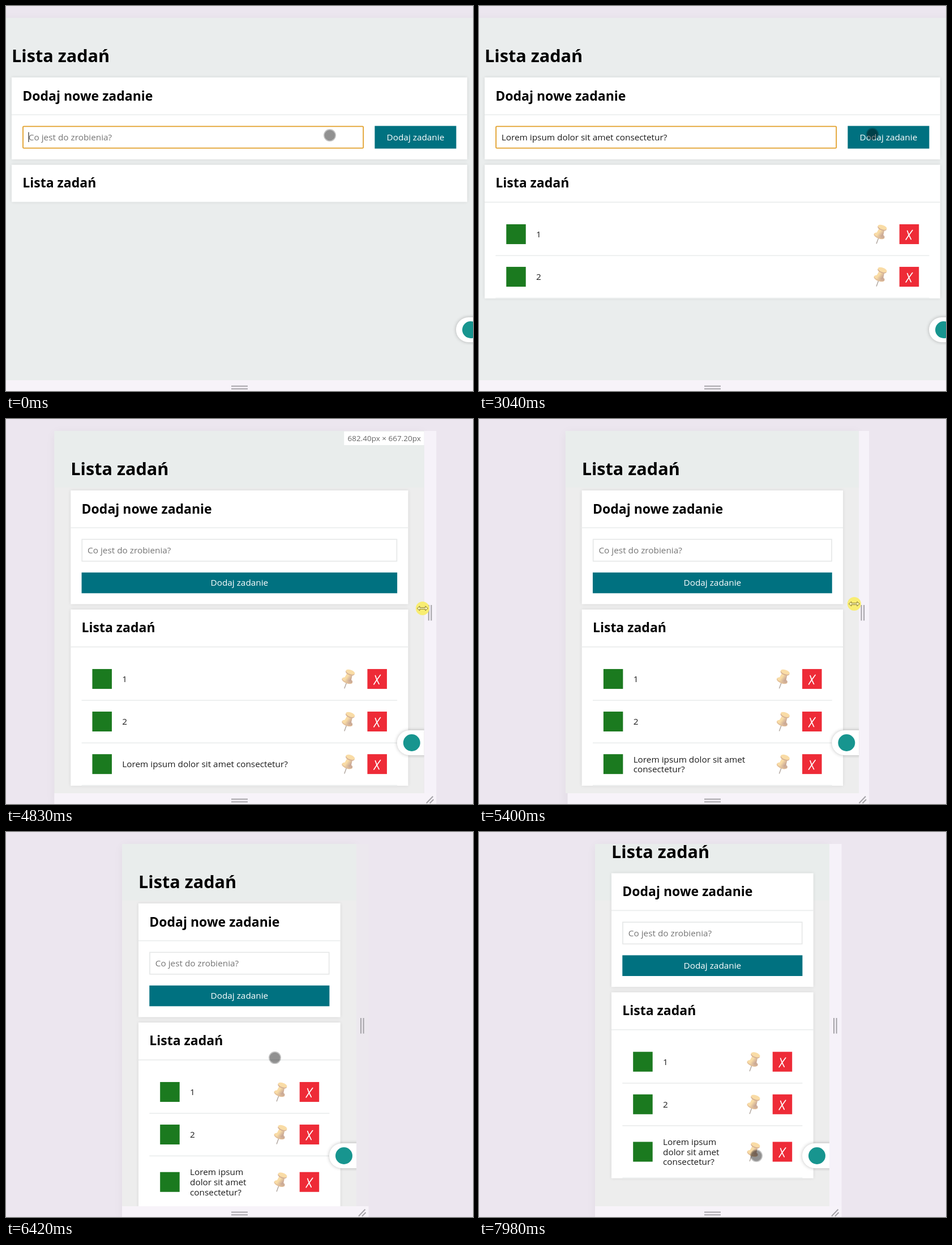
An HTML page for the animation above (8 s loop, 825 px wide and 679 px high).

```html
<!DOCTYPE html>
<html lang="pl">
<head>
<meta charset="utf-8">
<title>Lista zadań</title>
<style>
html, body { margin: 0; width: 100%; height: 100%; overflow: hidden; background: #ece6ef; }
svg { display: block; width: 825px; height: 679px; font-family: "Open Sans", sans-serif; font-size: 15.33px; fill: #1c1c1c; white-space: pre; }
.h1 { font-size: 30.66px; font-weight: 700; fill: #000; }
.h2 { font-size: 23px; font-weight: 700; fill: #000; }
.hint { fill: #757575; }
.btn { fill: #fff; text-anchor: middle; }
.tag { font-size: 13.5px; fill: #666; text-anchor: end; }
</style>
</head>
<body>
<svg viewBox="0 0 825 679" xmlns="http://www.w3.org/2000/svg">
  <defs>
    <filter id="soft" x="-10%" y="-10%" width="120%" height="120%"><feGaussianBlur stdDeviation="3"/></filter>
    <filter id="wide" x="-10%" y="-10%" width="120%" height="120%"><feGaussianBlur stdDeviation="9"/></filter>
    <linearGradient id="shade" x1="0" x2="1" y1="0" y2=".4">
      <stop offset=".45" stop-color="#f9dca6"/><stop offset="1" stop-color="#c9a896"/>
    </linearGradient>
    <clipPath id="view"><rect id="hole" y="21" height="639"/></clipPath>
    <g id="pin" transform="rotate(20)">
      <path d="M0 5V18" stroke="#b3a9a2" stroke-width="1.5"/>
      <ellipse cy="3.5" rx="10" ry="4.5" fill="#e3bf98"/>
      <ellipse cy="2.2" rx="9.6" ry="4" fill="url(#shade)"/>
      <path d="M-4.5 -11H5L6.5 2Q0 6 -6.5 2Z" fill="url(#shade)"/>
      <ellipse cy="-11.5" rx="8.3" ry="4.2" fill="#d5b195"/>
      <ellipse cy="-13" rx="8.3" ry="3.8" fill="#f9dca6"/>
    </g>
    <g id="del">
      <rect width="34.5" height="35" fill="#ee2b37"/>
      <path d="M14 11.5C15 15 18 22 20.5 26.5M23 10.5C19 16 15 21 11.5 27" fill="none" stroke="#fff" stroke-width="1.7" stroke-linecap="round"/>
    </g>
    <g id="resize">
      <circle r="12" fill="#f8ed72"/>
      <path d="M-9.5 0L-5 -4V-1.3H5V-4L9.5 0L5 4V1.3H-5V4Z" fill="#fbf6b8" stroke="#84762c" stroke-width="1"/>
    </g>
    <g id="dot">
      <circle r="11" fill="#000" fill-opacity=".24"/>
      <circle r="9.3" fill="#000" fill-opacity=".25"/>
    </g>
  </defs>
  <g id="scene"></g>
</svg>
<script>
const LOOP = 8000, SCALE = 0.9579, MID = 412, LINE = 17.6;
const LOREM = "Lorem ipsum dolor sit amet consectetur?";
const scene = document.getElementById("scene");
const hole = document.getElementById("hole");
const pen = document.createElement("canvas").getContext("2d");
pen.font = '15.33px "Open Sans", sans-serif';

// keys: [time, value, value...] joined by straight lines
function track(keys, t) {
  if (t <= keys[0][0]) return keys[0].slice(1);
  for (let i = 1; i < keys.length; i++) {
    const a = keys[i - 1], b = keys[i];
    if (t < b[0]) {
      const k = (t - a[0]) / (b[0] - a[0]);
      return a.slice(1).map((v, j) => v + (b[j + 1] - v) * k);
    }
  }
  return keys[keys.length - 1].slice(1);
}

const WIDTH = [[4080, 862], [4320, 823], [4830, 653.7], [5400, 519], [5730, 418], [5800, 418], [5900, 414]];
const SCROLL = [[6450, 0], [6810, 53.3]];
const POINTER = [
  [0, 572, 228], [40, 572, 228], [100, 629, 229], [700, 629, 229], [1000, 695, 226],
  [3400, 695, 226], [3660, 840, 320], [4080, 828, 339], [4320, 814, 337], [4830, 736, 334],
  [5400, 663, 326], [5730, 626, 330], [6250, 626, 332], [6420, 475, 398], [6600, 473, 418],
  [6970, 473, 419], [7250, 551, 545], [7430, 535, 567], [7800, 535, 572], [7980, 490, 571]
];
// caret visible from..to
const CARET = [[0, 430], [600, 1490], [1490, 2430], [2550, 3040], [3370, 3870]];

const within = (t, a, b) => t >= a && t < b;
const rect = (x, y, w, h, fill, more = "") =>
  `<rect x="${x}" y="${y}" width="${Math.max(0, w)}" height="${h}" fill="${fill}" ${more}/>`;
const text = (x, y, s, cls = "") => `<text x="${x}" y="${y}" class="${cls}">${s}</text>`;
const use = (id, x, y) => `<use href="#${id}" x="${x}" y="${y}"/>`;
const rule = (x, y, w) => rect(x, y, w, 1.8, "#eceeee");
const strokes = (d, c = "#a5a3a8") => `<path d="${d}" stroke="${c}" stroke-width="2" fill="none"/>`;

function card(x, y, w, h) {
  return rect(x, y, w, h, "#000", 'opacity=".09" filter="url(#soft)"') + rect(x, y, w, h, "#fff");
}

function wrap(s, room) {
  const lines = [""];
  for (const word of s.split(" ")) {
    const last = lines[lines.length - 1];
    const next = last ? last + " " + word : word;
    if (!last || pen.measureText(next).width <= room) lines[lines.length - 1] = next;
    else lines.push(word);
  }
  return lines;
}

function typed(t) {
  if (within(t, 600, 1100)) return "1";
  if (within(t, 1490, 1880)) return "2";
  return within(t, 2550, 3370) ? LOREM : "";
}

function itemsAt(t) {
  const n = [1100, 1880, 3370].filter(at => t >= at).length;
  return ["1", "2", LOREM].slice(0, n);
}

function form(t, x, r, narrow) {
  const focus = t < 4090, value = typed(t);
  const left = x + 19.3, right = r - 19.3;
  const end = narrow ? right : right - 163.5;
  let out = card(x, 126, r - x, narrow ? 200.5 : 144.5);
  out += text(left, 166.5, "Dodaj nowe zadanie", "h2") + rule(x, 190.8, r - x);
  out += rect(left + .7, 212.3, end - left - 1.4, 38.4, "#fff",
    focus ? 'rx="1.5" stroke="#e2a02a" stroke-width="1.8"' : 'stroke="#e6e8e8" stroke-width="1.7"');
  out += text(left + 10.5, 237, value || "Co jest do zrobienia?", value ? "" : "hint");
  if (CARET.some(c => within(t, ...c))) {
    const cx = left + 10.5 + pen.measureText(value).width;
    out += rect(cx - .3, 222.5, 1, 17.5, "#000");
  }
  out += narrow
    ? rect(left, 270.7, right - left, 36.6, "#007180") + text((left + right) / 2, 294.3, "Dodaj zadanie", "btn")
    : rect(right - 144, 211.5, 144, 40, "#007180") + text(right - 72, 237, "Dodaj zadanie", "btn");
  return out;
}

function list(items, x, r, top) {
  const w = r - x;
  const rows = items.map(s => {
    const lines = wrap(s, w - 230);
    return { lines, h: Math.max(75.1, lines.length * LINE + 39.5) };
  });
  const total = rows.reduce((sum, row) => sum + row.h, 0);
  let out = card(x, top, w, rows.length ? 85.5 + total : 65.5);
  out += text(x + 19.3, top + 40, "Lista zadań", "h2");
  if (rows.length) out += rule(x, top + 65.1, w);
  let y = top + 85.5;
  for (const { lines, h } of rows) {
    const mid = y + h / 2 - .6;
    out += rect(x + 38.2, mid - 17.5, 34.5, 35, "#1b7a1f");
    lines.forEach((s, i) =>
      out += text(x + 91, mid + 5.7 + (i - (lines.length - 1) / 2) * LINE, s));
    out += use("pin", r - 106.5, mid) + use("del", r - 72, mid - 17.5);
    y += h;
    out += rule(x + 19.3, y - 1.3, w - 38.6);
  }
  return out;
}

function rails(t) {
  const w = track(WIDTH, t > 5200 ? t + 25 : t)[0];
  const l = MID - w / 2, r = MID + w / 2;
  const dim = within(t, 5800, 6500);
  return rect(r, 21, 21.5, 639, dim ? "#ece8ee" : "#f6f2f9") +
    rect(l, 660, w + 21.5, 19, "#f7f3f9") +
    strokes("M398 670.4H427M398 675.3H427") +
    strokes(`M${r + 8} 328V355.5M${r + 12.6} 328V355.5`) +
    strokes(`M${r + 4} 677.5L${r + 15.5} 665.5M${r + 10} 677.5L${r + 16.5} 671`);
}

function draw(t) {
  const w = track(WIDTH, t)[0], l = MID - w / 2, r = MID + w / 2;
  const x = l + 29, end = r - 28.3;
  const narrow = w < 735, scroll = track(SCROLL, t)[0];
  const [px, py] = track(POINTER, t);
  hole.setAttribute("x", l);
  hole.setAttribute("width", w);

  let out = rect(0, 0, 825, 679, "#ece6ef");
  out += rect(l, 24, w, 660, "#000", 'opacity=".045" filter="url(#wide)"');
  out += rails(t);
  out += '<g clip-path="url(#view)">' + rect(l, 21, w, 639, t < 4500 ? "#eaeded" : "#ededed");
  if (t >= 4500) out += rect(l, 21, w, 100, "#e9edec");
  out += `<g transform="translate(0 ${-scroll})">` +
    text(x, 99, "Lista zadań", "h1") +
    form(t, x, end, narrow) +
    list(itemsAt(t), x, end, narrow ? 336 : 280) + "</g>";
  const pill = `M${r + 5} 549H${r - 26}A22 22 0 0 0 ${r - 26} 593H${r + 5}Z`;
  out += `<path d="${pill}" opacity=".25" fill="#000" filter="url(#soft)"/><path d="${pill}" fill="#fff"/>`;
  out += `<circle cx="${r - 22}" cy="571" r="15" fill="#17958f"/>`;
  if (within(t, 4090, 5200)) {
    const px = (Math.round(w / SCALE / .8) * .8).toFixed(2);
    out += rect(r - 141.5, 22, 141.5, 24, "#fff") + text(r - 6, 39.3, px + "px × 667.20px", "tag");
  }
  out += "</g>";
  scene.innerHTML = out + use(within(t, 4080, 6260) ? "resize" : "dot", px, py);
}

function tick(now) {
  draw(now % LOOP);
  requestAnimationFrame(tick);
}
draw(0);
requestAnimationFrame(tick);
</script>
</body>
</html>
```
